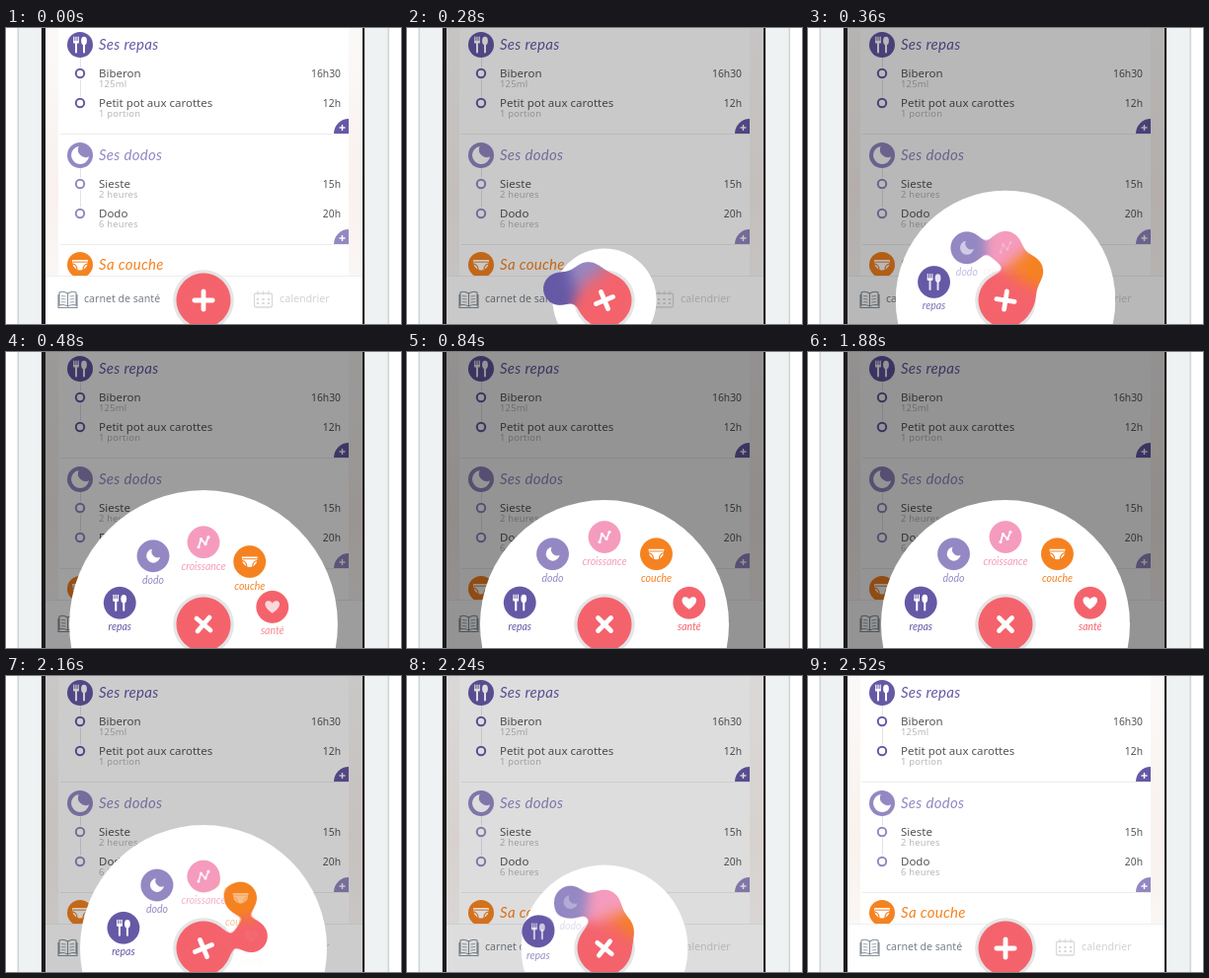
Write an HTML page with a canvas that moves like this. It is 400x300 px and loops after 3 s.

```html
<!DOCTYPE html>
<html lang="fr">
<head>
<meta charset="utf-8">
<style>
  html, body { margin: 0; width: 100%; height: 100%; overflow: hidden; background: #fff; }
  canvas, svg { position: absolute; left: 0; top: 0; width: 400px; height: 300px; }
</style>
</head>
<body>
<canvas id="base" width="400" height="300"></canvas>
<svg viewBox="0 0 400 300">
  <defs>
    <filter id="goo" filterUnits="userSpaceOnUse" x="0" y="0" width="400" height="340" color-interpolation-filters="sRGB">
      <feGaussianBlur stdDeviation="7.2"/>
      <feColorMatrix values="1 0 0 0 0  0 1 0 0 0  0 0 1 0 0  0 0 0 20 -7.6"/>
    </filter>
  </defs>
  <g id="blobs" filter="url(#goo)"></g>
</svg>
<canvas id="top" width="400" height="300"></canvas>
<script>
const LOOP = 3000, CLOSE = 1880, REWIND = 2578;
const CX = 200, CY = 276, REACH = 88.5;
const PURPLE = '#6559a6', LILAC = '#9488c3', PINK = '#f59bbd', ORANGE = '#f58220', RED = '#f4636c';
const SANS = '"Noto Sans", sans-serif', SCRIPT = 'Lato, sans-serif';

const base = document.getElementById('base').getContext('2d');
const over = document.getElementById('top').getContext('2d');
const blobs = document.getElementById('blobs');

const clamp = (v, lo = 0, hi = 1) => Math.min(hi, Math.max(lo, v));
const span = (t, from, to) => clamp((t - from) / (to - from));
const inOut = x => (1 - Math.cos(Math.PI * x)) / 2;
const outQuart = x => 1 - (1 - x) ** 4;
const outBack = x => 1 + 2.70158 * (x - 1) ** 3 + 1.70158 * (x - 1) ** 2;

const items = [
  { icon: 'meal', label: 'repas', color: PURPLE, x: 114, y: 254 },
  { icon: 'moon', label: 'dodo', color: LILAC, x: 147, y: 204 },
  { icon: 'chart', label: 'croissance', color: PINK, x: 200, y: 187 },
  { icon: 'diaper', label: 'couche', color: ORANGE, x: 253, y: 204 },
  { icon: 'heart', label: 'santé', color: RED, x: 287, y: 254 }
];

const sections = [
  { y: 17, icon: 'meal', size: 1, title: 'Ses repas', color: PURPLE,
    rows: [['Biberon', '125ml', '16h30'], ['Petit pot aux carottes', '1 portion', '12h']] },
  { y: 129, icon: 'moon', size: 1.3, title: 'Ses dodos', color: LILAC,
    rows: [['Sieste', '2 heures', '15h'], ['Dodo', '6 heures', '20h']] },
  { y: 240, icon: 'diaper', size: 1, title: 'Sa couche', color: ORANGE, rows: [] }
];

function addBlob(r, color) {
  const c = document.createElementNS('http://www.w3.org/2000/svg', 'circle');
  c.setAttribute('r', r);
  c.setAttribute('fill', color);
  c.setAttribute('cx', CX);
  c.setAttribute('cy', CY);
  blobs.appendChild(c);
  return c;
}
for (const item of items) item.blob = addBlob(16.3, item.color);
addBlob(26.7, RED);

function box(g, x, y, w, h, color) {
  g.fillStyle = color;
  g.fillRect(x, y, w, h);
}

function disc(g, x, y, r, color) {
  g.fillStyle = color;
  g.beginPath();
  g.arc(x, y, r, 0, Math.PI * 2);
  g.fill();
}

function line(g, color, width, ...pts) {
  g.strokeStyle = color;
  g.lineWidth = width;
  g.beginPath();
  for (let i = 0; i < pts.length; i += 2) g.lineTo(pts[i], pts[i + 1]);
  g.stroke();
}

function text(g, str, x, y, font, color, align = 'left') {
  g.font = font;
  g.fillStyle = color;
  g.textAlign = align;
  g.fillText(str, x, y);
}

const moonPath = new Path2D('M-1 -7A7 7 0 1 0 7 1A6 6 0 0 1 -1 -7Z');
const heartPath = new Path2D('M0 6.5C-10 0 -8 -6 -4 -6C-2 -6 -.6 -5 0 -3.5C.6 -5 2 -6 4 -6C8 -6 10 0 0 6.5Z');
const diaperPath = new Path2D('M-8 -5H8L7 1Q4 5.5 0 5.5T-7 1Z');
const legPath = new Path2D('M-7.5 -1Q-3 0 -3 5M7.5 -1Q3 0 3 5');

const icons = {
  meal(g) {
    for (const x of [-6.2, -4, -1.8]) line(g, '#fff', 1.2, x, -8, x, -3);
    box(g, -6.8, -4, 5.6, 2.5, '#fff');
    line(g, '#fff', 2, -4, -3, -4, 7.5);
    g.beginPath();
    g.ellipse(4, -4, 2.9, 4.2, 0, 0, Math.PI * 2);
    g.fill();
    line(g, '#fff', 2, 4, -1, 4, 7.5);
  },
  moon(g) { g.fill(moonPath); },
  heart(g) { g.fill(heartPath); },
  diaper(g, color) {
    g.fill(diaperPath);
    g.strokeStyle = color;
    g.lineWidth = 1.2;
    g.stroke(legPath);
    line(g, color, 1, -7, -2.8, 7, -2.8);
  },
  chart(g) {
    line(g, '#fff', 1.8, -5, 5, -2.5, -3, 2, 2, 5, -5);
    for (const [x, y] of [[-5, 5], [-2.5, -3], [2, 2], [5, -5]]) disc(g, x, y, 1.6, '#fff');
  }
};

function icon(g, name, x, y, color, size = 1) {
  g.save();
  g.translate(x, y);
  g.scale(size, size);
  g.fillStyle = '#fff';
  g.lineCap = g.lineJoin = 'round';
  icons[name](g, color);
  g.restore();
}

function drawSection(g, { y, icon: name, size, title, color, rows }) {
  if (rows.length) line(g, '#e2e2e7', 1, 75.5, y + 13, 75.5, y + 59);
  disc(g, 75, y, 13, color);
  icon(g, name, 75, y, color, size);
  g.letterSpacing = '0.3px';
  text(g, title, 94, y + 4.5, `italic 15px ${SCRIPT}`, color);
  g.letterSpacing = '0px';
  rows.forEach(([name, detail, hour], i) => {
    const ry = y + 29 + i * 30;
    disc(g, 75, ry, 6.5, '#fff');
    g.strokeStyle = color;
    g.lineWidth = 2;
    g.beginPath();
    g.arc(75, ry, 4.2, 0, Math.PI * 2);
    g.stroke();
    text(g, name, 94, ry + 4, `11.5px ${SANS}`, '#555558');
    g.letterSpacing = '0.2px';
    text(g, detail, 94, ry + 14, `9.4px ${SANS}`, '#b8b8ba');
    g.letterSpacing = '0px';
    text(g, hour, 339, ry + 4, `10.3px ${SANS}`, '#555558', 'right');
  });
  if (!rows.length) return;
  const end = y + 90;
  line(g, '#ececee', 1, 55, end + .5, 347, end + .5);
  g.fillStyle = color;
  g.beginPath();
  g.moveTo(347, end);
  g.arc(347, end, 15, Math.PI, Math.PI * 1.5);
  g.fill();
  line(g, '#fff', 1.4, 337.5, end - 6, 343.5, end - 6);
  line(g, '#fff', 1.4, 340.5, end - 9, 340.5, end - 3);
}

function drawBar(g) {
  box(g, 40, 252, 321, 48, '#fff');
  box(g, 40, 251, 321, 1, '#eeeef0');
  const ink = '#858e98', pale = '#dadadd';
  g.strokeStyle = ink;
  g.lineWidth = 1.1;
  g.stroke(new Path2D('M62.5 269Q58 266 54 268V281Q58 279.5 62.5 282Q67 279.5 71 281V268Q67 266 62.5 269V282M53 270V283.5H72V270'));
  for (const y of [271.5, 274.5, 277.5]) {
    line(g, ink, .8, 56, y, 60.5, y + .5);
    line(g, ink, .8, 64.5, y + .5, 69, y);
  }
  text(g, 'carnet de santé', 79, 278, `10.6px ${SANS}`, '#777f87');
  g.strokeStyle = pale;
  g.lineWidth = 1.3;
  g.beginPath();
  g.roundRect(251.5, 269, 18, 14, 2);
  g.stroke();
  for (const x of [255, 260.5, 266]) {
    line(g, pale, 1.3, x, 266.5, x, 270.5);
    for (const y of [274, 278]) box(g, x - 1.2, y, 2.4, 2, pale);
  }
  text(g, 'calendrier', 277, 278, `10.7px ${SANS}`, '#d2d2d6');
}

function drawPhone(g) {
  box(g, 0, 0, 400, 300, '#fff');
  box(g, 12, 0, 376, 300, '#eff2f2');
  for (const x of [11.5, 386.5]) box(g, x, 0, 1.6, 300, '#d2d5d6');
  box(g, 35, 0, 329, 300, '#d8d8d8');
  box(g, 36, 0, 327, 300, '#1c1c1e');
  box(g, 40, 0, 321, 300, '#fbf9f8');
  const tint = g.createLinearGradient(0, 0, 0, 300);
  tint.addColorStop(0, 'rgba(248,240,236,0)');
  tint.addColorStop(.55, 'rgba(248,238,233,.7)');
  tint.addColorStop(1, 'rgba(248,240,236,0)');
  box(g, 40, 0, 321, 300, tint);
  box(g, 53, 0, 294, 300, '#fff');
}

function drawBase(t, T) {
  const g = base;
  drawPhone(g);
  sections.forEach(s => drawSection(g, s));
  drawBar(g);

  const shade = .42 * (t < CLOSE ? span(t, 40, 520) : 1 - span(t, 1900, 2400));
  box(g, 40, 0, 321, 300, `rgba(0,0,0,${shade})`);

  // the white dome lags slightly behind the buttons on the way back
  const domeTime = t < CLOSE ? T : T - 22;
  const grow = outBack(span(domeTime, 257, 642));
  g.save();
  g.beginPath();
  g.rect(40, 0, 321, 300);
  g.clip();
  if (grow > 0) disc(g, CX, CY, 27 + 99 * grow, '#fff');
  disc(g, CX, CY, 30.8, '#e4e4e6');
  g.restore();
}

function drawMenu(t, T) {
  const g = over;
  g.clearRect(0, 0, 400, 300);
  items.forEach((item, i) => {
    const p = outQuart(span(T, 211 + 33 * i, 611 + 33 * i));
    const dx = item.x - CX, dy = item.y - CY;
    const k = p * REACH / Math.hypot(dx, dy);
    const x = CX + dx * k, y = CY + dy * k;
    item.blob.setAttribute('cx', x);
    item.blob.setAttribute('cy', y);
    g.globalAlpha = span(p, .55, .9);
    if (g.globalAlpha > 0) {
      icon(g, item.icon, x, y, item.color);
      text(g, item.label, x, y + 28, `italic 10.5px ${SCRIPT}`, item.color, 'center');
    }
  });
  g.globalAlpha = 1;

  const turn = t < CLOSE ? span(t, 20, 540) : 1 - span(t, 1880, 2440);
  g.save();
  g.translate(CX, CY);
  g.rotate(inOut(turn) * Math.PI * .75);
  g.lineCap = 'round';
  line(g, '#fff', 4.8, -9.2, 0, 9.2, 0);
  line(g, '#fff', 4.8, 0, -9.2, 0, 9.2);
  g.restore();
}

let start;
function frame(now) {
  start ??= now;
  const t = (now - start) % LOOP;
  const T = t < CLOSE ? t : Math.max(0, REWIND - t);
  drawBase(t, T);
  drawMenu(t, T);
  requestAnimationFrame(frame);
}
requestAnimationFrame(frame);
</script>
</body>
</html>
```
